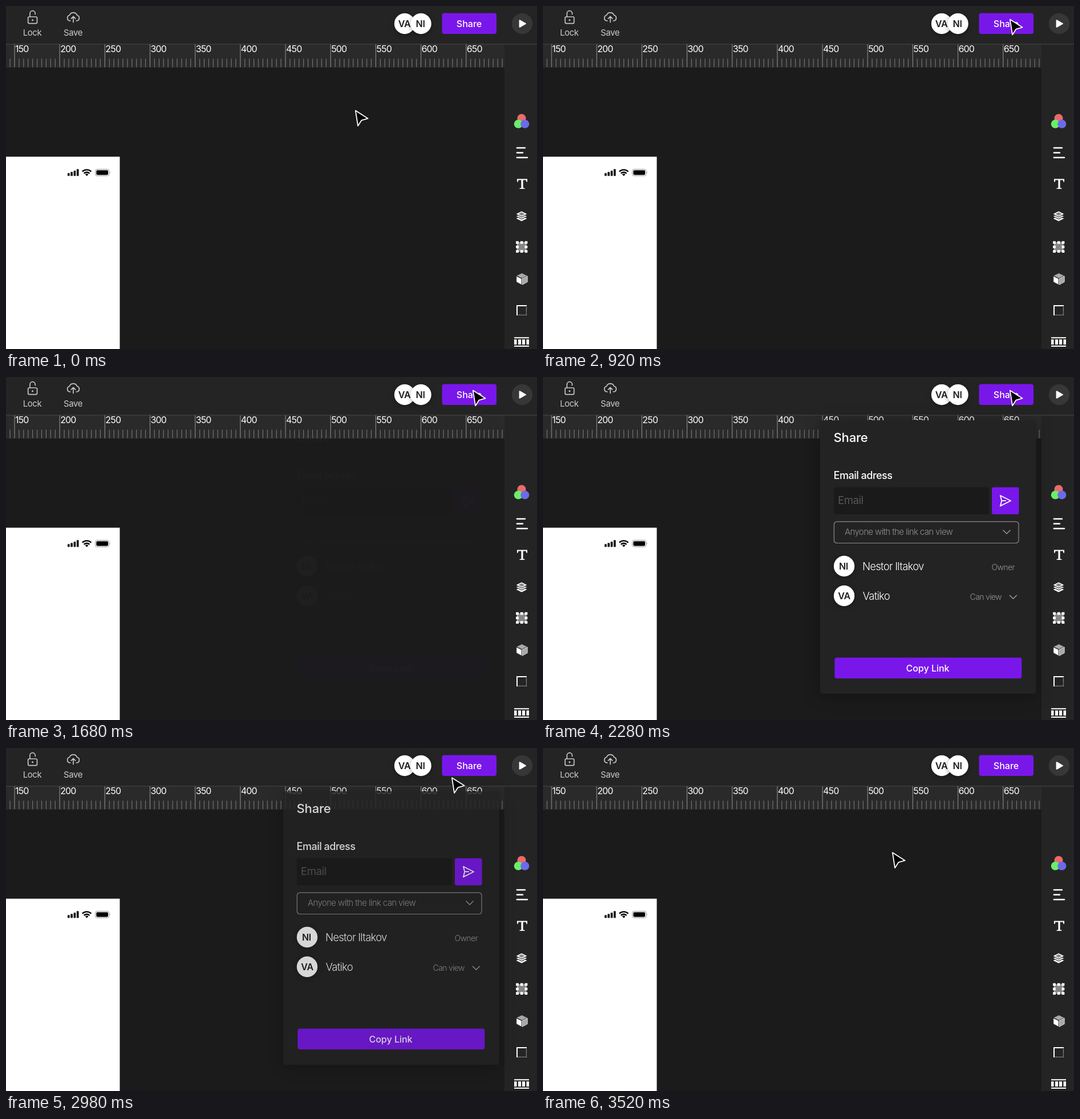
An HTML page that plays this animation: 931x602 px, repeating every 3560 ms.

```html
<!DOCTYPE html>
<html lang="en">
<head>
<meta charset="utf-8">
<title>Share panel</title>
<style>
  html, body { margin: 0; width: 100%; height: 100%; overflow: hidden; background: #1b1b1b; }
  svg { display: block; width: 931px; height: 602px; }
  text { font-family: Inter, "Liberation Sans", sans-serif; fill: #fff; }
  .mid { text-anchor: middle; }
  .tool { font-size: 15px; letter-spacing: -.4px; fill: #cbcbcb; }
  .num { font-size: 16px; letter-spacing: -.85px; }
  .btn { font-size: 16px; font-weight: 500; }
  .initials { font-size: 16px; font-weight: 600; letter-spacing: -.3px; fill: #1c1c1c; }
  .name { font-size: 18.5px; font-weight: 300; letter-spacing: -.75px; }
  .note { font-size: 14px; font-weight: 300; letter-spacing: -.65px; fill: #979797; }
  .line { fill: none; stroke-linecap: round; stroke-linejoin: round; }
  .purple { fill: #7917eb; }
  .soft { filter: drop-shadow(0 2px 4px rgba(0,0,0,.35)); }
  .deep { filter: drop-shadow(0 4px 14px rgba(0,0,0,.3)); }
</style>
</head>
<body>
<svg viewBox="0 0 931 602">
  <defs>
    <g id="chevron"><path class="line" d="M-6 -3L0 3L6 -3" stroke="#a0a0a0" stroke-width="1.4"/></g>
    <path id="diamond" d="M0 -5.2L10.4 0L0 5.2L-10.4 0Z"/>
  </defs>

  <rect width="931" height="602" fill="#1b1b1b"/>
  <path d="M0 264.5H199.5V602H0Z" fill="#fff"/>

  <!-- phone status icons -->
  <g id="bars"></g>
  <g class="line" stroke="#000" stroke-width="2.4" style="stroke-linecap:butt">
    <path d="M133.8 290.6A11 11 0 0 1 149.4 290.6"/>
    <path d="M136.7 293.8A6.9 6.9 0 0 1 146.5 293.8"/>
  </g>
  <path d="M141.6 298.4L138.8 295.6A4 4 0 0 1 144.4 295.6Z"/>
  <rect x="156.5" y="286.5" width="24.5" height="11.6" rx="3.2" fill="none" stroke="#999"/>
  <rect x="158.3" y="288.2" width="20.8" height="8.2" rx="1.8"/>
  <path d="M182.2 290.3Q184 292.3 182.2 294.3Z" fill="#999"/>

  <!-- ruler, toolbar, sidebar -->
  <rect y="67" width="874" height="41" fill="#2a2a2a"/>
  <g id="ruler"></g>
  <rect x="874" y="67" width="57" height="535" fill="#242424"/>
  <rect width="931" height="67" fill="#242424"/>
  <rect y="66.5" width="931" height="1" fill="#484848"/>

  <g class="line" stroke="#c6c6c6" stroke-width="1.7">
    <rect x="38.7" y="19" width="15.8" height="11.6" rx="2"/>
    <path d="M42 19V13A4.6 4.6 0 0 1 51.2 13V14.4"/>
    <path d="M112.8 26H112A5 5 0 0 1 111.4 16.2A7 7 0 0 1 124.6 16.2A5 5 0 0 1 124 26H123.2"/>
    <path d="M118 28.4V18.6M114.3 22.1L118 18.4L121.7 22.1"/>
  </g>
  <circle cx="46.6" cy="24.8" r="1.5" fill="#c6c6c6"/>
  <text class="tool mid" x="46" y="52">Lock</text>
  <text class="tool mid" x="117.6" y="52">Save</text>

  <g class="soft"><circle cx="699" cy="31" r="18.2" fill="#fff"/></g>
  <text class="initials mid" x="698.6" y="36.5">VA</text>
  <g class="soft"><circle cx="727.5" cy="31" r="18.2" fill="#fff"/></g>
  <text class="initials mid" x="726.6" y="36.5">NI</text>
  <rect class="purple" x="764.5" y="12.5" width="95.5" height="36.5" rx="4"/>
  <text class="btn mid" x="812" y="36.5">Share</text>
  <circle cx="905" cy="31" r="18.2" fill="#373737"/>
  <path class="line" d="M900.6 25.2L911 31L900.6 36.8Z" style="fill:#fff" stroke="#fff" stroke-width="2"/>

  <!-- sidebar icons -->
  <circle cx="904" cy="197" r="7.6" fill="#e96b6b"/>
  <circle cx="898.3" cy="207" r="7.6" fill="#6bed6b"/>
  <circle cx="909.8" cy="207" r="7.6" fill="#6b6bea"/>
  <path class="line" d="M895.8 249H910M895.8 257.5H906M895.8 266H914" stroke="#fff" stroke-width="2.4"/>
  <path d="M896 303.5H914V308.8H912.5L911.6 305.5H906.6V319.2L909.5 319.8V321H900.5V319.8L903.4 319.2V305.5H898.4L897.5 308.8H896Z" fill="#fff"/>
  <g fill="#fff" stroke="#242424">
    <use href="#diamond" x="904" y="373"/>
    <use href="#diamond" x="904" y="369" fill="#d8d8d8"/>
    <use href="#diamond" x="904" y="365"/>
  </g>
  <path d="M904 362L909.5 365L904 368L898.5 365Z" fill="#858585"/>
  <rect x="896.5" y="415.2" width="15.4" height="15.4" fill="#858585" stroke="#bbb"/>
  <g id="handles"></g>
  <g stroke="#242424" stroke-width=".8" stroke-linejoin="round">
    <path d="M904.4 468.7L914.2 473.3L904.4 478L894.8 473.3Z" fill="#a8a8a8"/>
    <path d="M894.8 474L904 478.5V489.3L894.8 484.3Z" fill="#fff"/>
    <path d="M914.2 474L905 478.5V489.3L914.2 484.3Z" fill="#a8a8a8" stroke="#eee"/>
  </g>
  <path d="M896 543V526H913" fill="none" stroke="#fff" stroke-width="2"/>
  <path d="M912.4 528.5V542.4H896" fill="none" stroke="#d0d0d0" stroke-width="1.3" stroke-dasharray="1.3 1.3"/>
  <path d="M891 582.2H917M891 597H917" stroke="#fff" stroke-width="2"/>
  <path d="M891 585.3H895.5V594.2H891ZM898 585.3H903V594.2H898ZM905 585.3H910V594.2H905ZM912.5 585.3H917V594.2H912.5Z" fill="#fff"/>

  <!-- share panel -->
  <g id="panel" opacity="0">
    <g class="deep"><rect x="486" y="76" width="378.5" height="480" rx="4" fill="#232323"/></g>
    <text x="509.6" y="113.5" font-size="22" font-weight="500" letter-spacing="-.2">Share</text>
    <text x="509.6" y="179" font-size="18" font-weight="500" letter-spacing="-.5">Email adress</text>
    <rect x="510" y="193.5" width="272" height="47.5" rx="3" fill="#1a1a1a"/>
    <text x="517" y="223" font-size="18.5" letter-spacing="-.4" style="fill:#575757">Email</text>
    <rect class="purple" x="787" y="193.5" width="47.5" height="47.5" rx="3"/>
    <path class="line" d="M801.8 208L820 217.2L801.8 226.4L804.2 217.2ZM804.2 217.2H811" stroke="#fff" stroke-width="1.8"/>
    <rect x="510.3" y="253.8" width="323.7" height="37.7" rx="5" fill="none" stroke="#8c8c8c" stroke-width="1.2"/>
    <text x="529" y="277" font-size="15" font-weight="300" letter-spacing="-.62" style="fill:#919191">Anyone with the link can view</text>
    <use href="#chevron" x="813" y="272"/>
    <g class="soft">
      <circle cx="528" cy="332" r="18.2" fill="#fff"/>
      <circle cx="528" cy="384" r="18.2" fill="#fff"/>
    </g>
    <text class="initials mid" x="527" y="337.5">NI</text>
    <text class="initials mid" x="528" y="389.5">VA</text>
    <text class="name" x="560" y="339">Nestor Iltakov</text>
    <text class="name" x="560.5" y="391">Vatiko</text>
    <text class="note" x="786.6" y="339">Owner</text>
    <text class="note" x="748.6" y="391">Can view</text>
    <use href="#chevron" x="824.3" y="386.3"/>
    <rect class="purple" x="511.3" y="492.5" width="328" height="36.5" rx="4"/>
    <text class="btn mid" x="674.5" y="516.5">Copy Link</text>
  </g>

  <path id="cursor" d="M.8 .6L22.6 14.4L11.4 17.6L5 27.4Z" fill="#000" stroke="#fff" stroke-width="1.8" stroke-linejoin="round"/>
</svg>
<script>
const LOOP = 3560;
const START = { x: 612, y: 183 }, END = { x: 818, y: 23 };
const $ = id => document.getElementById(id);

function add(parent, tag, attrs, label) {
  const el = document.createElementNS("http://www.w3.org/2000/svg", tag);
  for (const key in attrs) el.setAttribute(key, attrs[key]);
  if (label !== undefined) el.textContent = label;
  $(parent).appendChild(el);
}

function buildRuler() {
  const gap = 7.917;
  for (let i = -1; i <= 108; i++) {
    const x = 15 + i * gap, major = i % 10 === 0;
    const y = major ? 67 : 92.5;
    add("ruler", "rect", { x: x - .6, y, width: 1.2, height: 107.5 - y, fill: major ? "#858585" : "#737373" });
    if (major) add("ruler", "text", { class: "num", x: x + 1, y: 81 }, 150 + i * 5);
  }
}

function buildIcons() {
  [5, 7, 9.3, 12].forEach((h, i) =>
    add("bars", "rect", { x: 108 + i * 5.3, y: 298.3 - h, width: 3.6, height: h, rx: .9 }));
  for (let i = 0; i < 9; i++) {
    if (i === 4) continue;
    const x = 896.5 + (i % 3) * 7.7, y = 415.2 + Math.floor(i / 3) * 7.7;
    add("handles", "rect", { x: x - 2.4, y: y - 2.4, width: 4.8, height: 4.8, rx: .5, fill: "#fff" });
  }
}

// cubic-bezier(.42, 0, .58, 1), solved by bisection
function easeInOut(p) {
  if (p <= 0) return 0;
  if (p >= 1) return 1;
  let lo = 0, hi = 1, s = .5;
  for (let i = 0; i < 24; i++) {
    s = (lo + hi) / 2;
    const x = 3 * (1 - s) * (1 - s) * s * .42 + 3 * (1 - s) * s * s * .58 + s * s * s;
    if (x < p) lo = s; else hi = s;
  }
  return s * s * (3 - 2 * s);
}

const ramp = (t, from, length) => easeInOut((t - from) / length);

function draw(t) {
  const back = ramp(t, 2868, 385);
  const go = ramp(t, 427, 370) - back;
  const x = START.x + (END.x - START.x) * go;
  const y = START.y + (END.y - START.y) * go;
  $("cursor").setAttribute("transform", `translate(${x.toFixed(2)} ${y.toFixed(2)})`);
  $("panel").setAttribute("opacity", (ramp(t, 1645, 385) - back).toFixed(4));
}

buildRuler();
buildIcons();
const origin = performance.now();
function tick() {
  draw((performance.now() - origin) % LOOP);
  requestAnimationFrame(tick);
}
draw(0);
requestAnimationFrame(tick);
</script>
</body>
</html>
```
